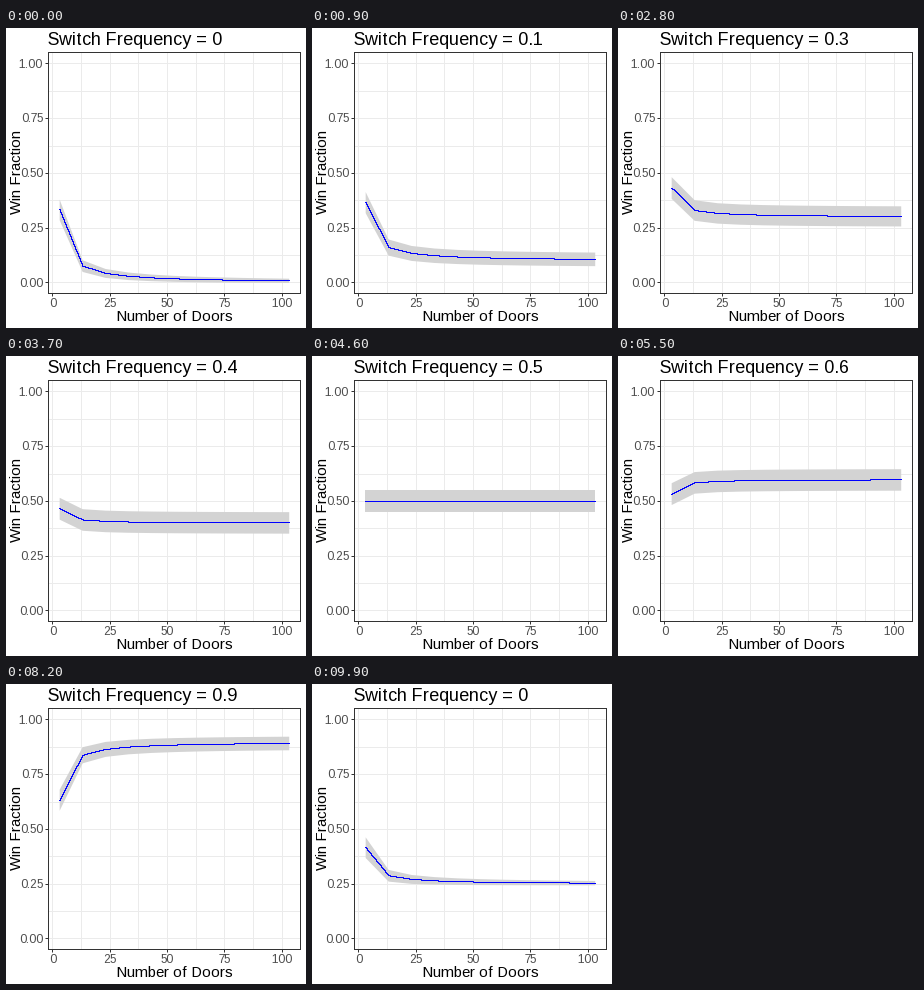
A matplotlib script that plays this animation: 300x300 px, repeating every 10000 ms.

```python
import numpy as np
import matplotlib.pyplot as plt
from matplotlib.animation import FuncAnimation

SIZE, DPI = 300, 100
FRAMES, INTERVAL = 100, 100
STATES = 11
TRIALS = 100
PX = 72 / DPI  # one pixel in points
LEFT, TOP, WIDTH, HEIGHT = 41.7, 24.42, 252.5, 241  # panel in pixels

plt.rcParams.update({"font.family": "Liberation Sans", "text.hinting_factor": 1})

# Expected win fraction and its standard error for switch frequencies 0 to 1
doors = np.arange(3, 104, 10)
freqs = np.arange(STATES) / 10
means = freqs[:, None] * (1 - 1 / doors) + (1 - freqs[:, None]) / doors
spread = np.sqrt(means * (1 - means) / TRIALS)

# Each transition follows a pause; the first two take one frame more
index = np.arange(STATES)
starts = 5 + 9 * index + np.minimum(index, 2)
steps = np.where(index < 2, 5, 4)


def position(frame):
    return np.clip((frame - starts + 1) / steps, 0, 1).sum()


def label(x, y, text, size, **kwargs):
    return fig.text(x / SIZE, 1 - y / SIZE, text, fontsize=size * PX, **kwargs)


fig = plt.figure(figsize=(SIZE / DPI, SIZE / DPI), dpi=DPI, facecolor="white")
ax = fig.add_axes([LEFT / SIZE, 1 - (TOP + HEIGHT) / SIZE,
                   WIDTH / SIZE, HEIGHT / SIZE])
ax.set(xlim=(-2, 108), ylim=(-0.05, 1.05))
ax.set_xticks(np.arange(0, 101, 25))
ax.set_yticks(np.arange(0, 1.01, 0.25))
ax.tick_params(length=3 * PX, width=PX, color="#333333",
               labelbottom=False, labelleft=False)
for spine in ax.spines.values():
    spine.set(color="#333333", linewidth=PX)

for k in np.arange(0, 1.01, 0.125):
    ax.axvline(100 * k, color="#EBEBEB", lw=PX, zorder=0)
    ax.axhline(k, color="#EBEBEB", lw=PX, zorder=0)

for k in range(5):
    label(46.2 + 57.4 * k, 279, f"{25 * k}", 12, color="#4D4D4D", ha="center")
    label(36.8, 258.8 - 54.77 * k, f"{k / 4:.2f}", 12, color="#4D4D4D", ha="right")
label(168.2, 293, "Number of Doors", 15, ha="center")
label(18, 144.2, "Win Fraction", 15, rotation=90, ha="right", va="center")
title = label(41.8, 17, "", 18)

band = ax.fill_between(doors, means[0], means[0], color="#D3D3D3", lw=0, zorder=1)

# One sample per pixel column, snapped, keeps the line crisp
columns = np.linspace(doors[0], doors[-1], 231)
line, = ax.plot(columns, columns, color="#0000FF", lw=PX,
                drawstyle="steps-mid", snap=True, zorder=2)


def update(frame):
    pos = position(frame)
    here = int(pos) % STATES
    after = (here + 1) % STATES
    t = pos - int(pos)

    def blend(rows):
        return (1 - t) * rows[here] + t * rows[after]

    low, high = blend(means - spread), blend(means + spread)
    outline = np.column_stack([np.r_[doors, doors[::-1]], np.r_[low, high[::-1]]])
    band.set_verts([outline])
    line.set_ydata(np.interp(columns, doors, blend(means)))
    title.set_text(f"Switch Frequency = {freqs[after if t > 0.5 else here]:g}")
    return band, line, title


anim = FuncAnimation(fig, update, frames=FRAMES, interval=INTERVAL,
                     repeat=True, repeat_delay=0)
plt.show()
```
